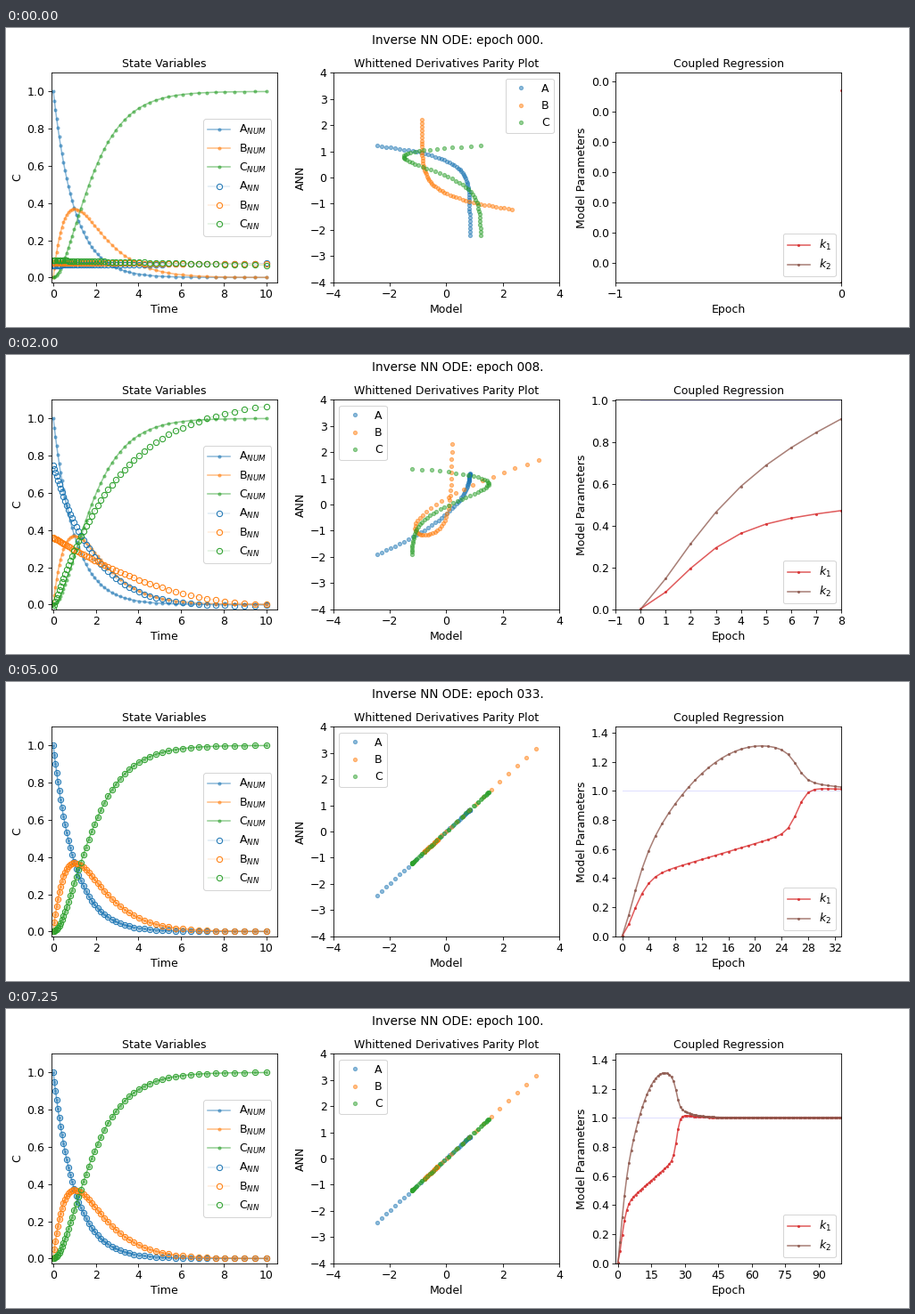
A matplotlib script for the animation above (7500 ms loop, 1012x336 px).

```python
import math

import matplotlib.pyplot as plt
import numpy as np
from matplotlib.animation import FuncAnimation
from matplotlib.ticker import FormatStrFormatter, MaxNLocator

DPI = 75
FRAMES = 30
SPECIES = "ABC"
COLORS = ["tab:blue", "tab:orange", "tab:green"]

plt.rcParams.update({"font.family": "DejaVu Sans", "font.size": 12,
                     "axes.titlesize": 12, "legend.fontsize": 12})


def whiten(values):
    return (values - values.mean()) / values.std()


def decay(scale):
    return np.exp(-t / scale)


# Reaction chain A -> B -> C with both rate constants equal to one
t = np.geomspace(1, 11, 50) - 1
A = np.exp(-t)
B = t * A
C = 1 - A - B

# Key stages of training: network states and their derivatives
STAGE_EPOCHS = [0, 4, 8, 12, 20, 30]
STATES = np.array([
    [0.066 + 0.001 * t, 0.078 - 0.0005 * t, 0.092 - 0.0026 * t],
    [0.76 * decay(2.1) - 0.045,
     0.345 * decay(5) - 0.075 * (t / 10)**4,
     0.57 - 0.5 * decay(1.8) + 0.061 * t],
    [0.81 * decay(2) - 0.06 + 0.005 * t,
     0.36 - 0.07 * t + 0.0034 * t**2,
     1.11 - 1.13 * decay(3.1)],
    [0.81 * decay(1.8) - 0.05 + 0.005 * t,
     0.35 - 0.07 * t + 0.0035 * t**2,
     1.08 - 1.1 * decay(2.8)],
    [0.85 * decay(1.5) - 0.01,
     0.317 * np.exp(-(t / 3.5)**1.8) - 0.012,
     1.04 - 1.06 * decay(2.4)],
    [A, B, C],
])
RATES = np.array([[whiten(rate) for rate in stage] for stage in [
    [decay(20), -decay(20), decay(20)],
    [-decay(2.1), decay(2) + 0.072 * t, decay(14)],
    [-decay(2), decay(1.3) + 0.112 * t, decay(7)],
    [-decay(1.8), decay(1) + 0.117 * t, decay(5)],
    [-decay(1.4), decay(1.15) + 0.067 * t, decay(3.5) + 0.45 * B],
    [-A, A - B, B],
]])


def fitted_constants(epoch):
    """Quick start and slow drift, then a switch to the true value of one."""
    start = 1 - np.exp(-(epoch / 2.7)**1.6)
    switch = 1 / (1 + np.exp((26.5 - epoch) / 0.75))
    drift1 = 0.363 * start + 0.0136 * epoch
    drift2 = 0.273 * start + 1.036 * (1 - (1 - epoch / 21)**2)
    settle1 = 1 + 0.018 * np.exp((29 - epoch) / 8)
    settle2 = 1 + 0.05 * np.exp((29 - epoch) / 6)
    return (0.00114 * (1 - switch) + drift1 * (1 - switch) + settle1 * switch,
            -0.00013 * (1 - switch) + drift2 * (1 - switch) + settle2 * switch)


EPOCHS = np.arange(101)
K1, K2 = fitted_constants(EPOCHS)


def epoch_at(frame):
    """One epoch per frame at first, then geometric growth up to 100."""
    if frame < 10:
        return frame
    return int(100.99 * math.exp(-0.12145 * (FRAMES - 1 - frame)))


def at_epoch(stages, epoch):
    position = np.interp(epoch, STAGE_EPOCHS, range(len(stages)))
    low = min(int(position), len(stages) - 2)
    mix = position - low
    return (1 - mix) * stages[low] + mix * stages[low + 1]


fig, (ax_state, ax_parity, ax_fit) = plt.subplots(
    1, 3, figsize=(1012 / DPI, 336 / DPI), dpi=DPI)
fig.subplots_adjust(left=0.05, right=0.925, bottom=0.15, top=0.85, wspace=0.25)
heading = fig.suptitle("", fontsize=13)

ax_state.set(title="State Variables", xlabel="Time", ylabel="C",
             xlim=(-0.1, 10.5), ylim=(-0.025, 1.1))
for name, color, values in zip(SPECIES, COLORS, (A, B, C)):
    ax_state.plot(t, values, ".-", color=color, ms=6, alpha=0.5,
                  label=name + "$_{NUM}$")
state_lines = [
    ax_state.plot([], [], "o-", color=color, lw=0.2, ms=6, mfc="none",
                  label=name + "$_{NN}$")[0]
    for name, color in zip(SPECIES, COLORS)]
ax_state.legend(loc="center right")

ax_parity.set(title="Whittened Derivatives Parity Plot", xlabel="Model",
              ylabel="ANN", xlim=(-4, 4), ylim=(-4, 4))
parity_lines = [
    ax_parity.plot([], [], ".", color=color, ms=8, alpha=0.5, label=name)[0]
    for name, color in zip(SPECIES, COLORS)]
ax_parity.legend(loc="best")

ax_fit.set(title="Coupled Regression", xlabel="Epoch",
           ylabel="Model Parameters")
ax_fit.xaxis.set_major_locator(MaxNLocator(integer=True))
ax_fit.yaxis.set_major_formatter(FormatStrFormatter("%.1f"))
true_line, = ax_fit.plot([], [], color="b", lw=1, alpha=0.12)
fit_lines = [
    ax_fit.plot([], [], ".-", color=color, ms=4, alpha=0.75, label=label)[0]
    for color, label in (("tab:red", "$k_1$"), ("tab:brown", "$k_2$"))]
ax_fit.legend(loc="lower right")


def update(frame):
    epoch = epoch_at(frame)
    heading.set_text(f"Inverse NN ODE: epoch {epoch:03d}.")

    for line, values in zip(state_lines, at_epoch(STATES, epoch)):
        line.set_data(t, values)

    k1, k2 = K1[epoch], K2[epoch]
    model = (-k1 * A, k1 * A - k2 * B, k2 * B)
    for line, x, y in zip(parity_lines, model, at_epoch(RATES, epoch)):
        line.set_data(whiten(x), whiten(y))

    past = slice(0, epoch + 1)
    for line, values in zip(fit_lines, (K1, K2)):
        line.set_data(EPOCHS[past], values[past])
    true_line.set_data([0, epoch], [1, 1])
    ax_fit.set_xlim(-1, epoch)
    ax_fit.set_ylim(K2[0], 1.1 * max(K1[past].max(), K2[past].max()))
    return [heading, true_line, *state_lines, *parity_lines, *fit_lines]


anim = FuncAnimation(fig, update, frames=FRAMES, interval=250,
                     init_func=lambda: update(0), repeat=True, repeat_delay=0)
plt.show()
```
